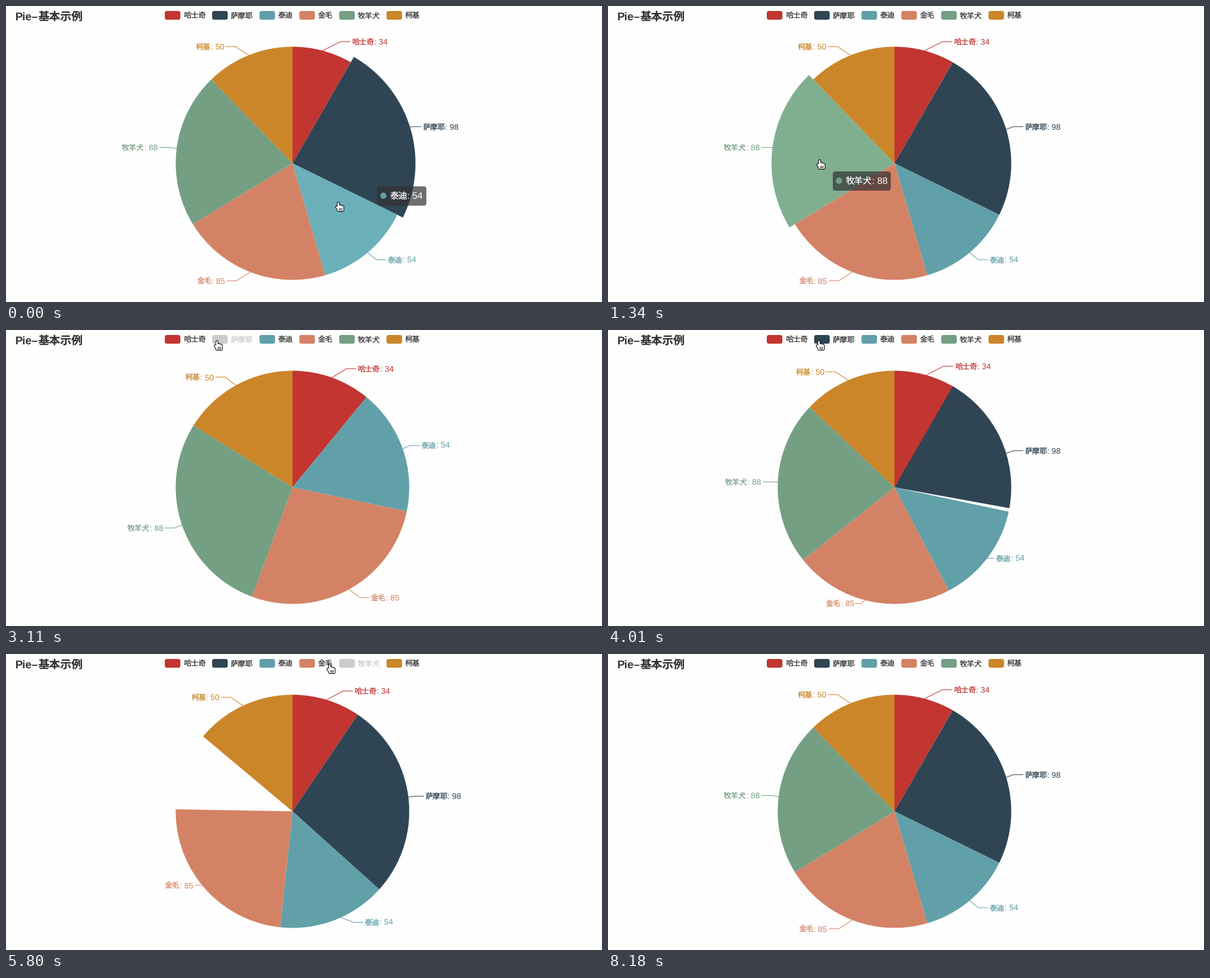
A matplotlib script for the animation above (8400 ms loop, 957 px wide and 476 px high).

```python
import matplotlib.pyplot as plt
import numpy as np
from matplotlib.animation import FuncAnimation
from matplotlib.colors import to_rgb
from matplotlib.patches import Circle, FancyBboxPatch, Polygon, Wedge

W, H, DPI = 957, 476, 64
PT = 72 / DPI
LOOP, TICK = 8400, 20
CX, CY, R = 460, 253, 187.5
GROW, LEN1, LEN2 = 10, 15, 15
EASE_MS = 300
CJK, LATIN = "Noto Sans CJK JP", "Liberation Sans"
INK, GREY = "#333333", "#cccccc"
KEY_TOP, KEY_BOTTOM = 8, 22

NAMES = ["哈士奇", "萨摩耶", "泰迪", "金毛", "牧羊犬", "柯基"]
VALUES = [34, 98, 54, 85, 88, 50]
COLORS = ["#c23531", "#2f4554", "#61a0a8", "#d48265", "#749f83", "#ca8629"]
LIFTED = [tuple(min(1, 1.1 * v) for v in to_rgb(c)) for c in COLORS]
N = len(NAMES)

# legend clicks: (time in ms, item)
CLICKS = [(2763, 1), (3874, 1), (5732, 4), (6328, 3), (6967, 3), (7690, 4)]

# pointer moves: first step, last step, then the Bezier points of the path
AWAY = (970, 495)
GLIDES = [
    (-1, 0, (600, 260), (536, 323)),
    (0, 8, (536, 323), (470, 395), (342, 255)),
    (10, 15, (342, 255), (341, 25)),
    (28, 32, (341, 25), (720, 40), AWAY),
    (33, 38, (766, 190), (680, 30), (567, 24)),
    (38, 39, (567, 24), (522, 24)),
    (39, 41, (522, 24), (490, 24)),
    (50, 52, (490, 24), (550, 24)),
    (52, 55, (550, 24), (720, 40), AWAY),
]
HOT = np.array([-2.5, -8.5])

# the picture advances in uneven steps of about 149 ms
STEPS, STEP_MS = [0, 19, 55], [0, 2810, 8180]


def step_at(ms):
    return np.interp(ms, STEP_MS, STEPS)


def pointer(step):
    """Centre of the pointer, gliding with a smooth start and stop."""
    first, last, *path = [g for g in GLIDES if g[0] <= step][-1]
    t = min(1, (step - first) / (last - first))
    t = t * t * (3 - 2 * t)
    pts = np.array(path, float)
    while len(pts) > 1:
        pts = pts[:-1] + t * (pts[1:] - pts[:-1])
    return pts[0]


def layout(shown):
    """Angles, guide line points, label anchor and side of each item."""
    total = sum(VALUES[i] for i in shown)
    angle, out = 0, {}
    for i in sorted(shown):
        end = angle + 360 * VALUES[i] / total
        mid = np.radians((angle + end) / 2)
        nx, ny = np.sin(mid), -np.cos(mid)
        side = 1 if nx > 0 else -1
        y = CY + ny * (R + LEN1)
        x = CX + side * np.sqrt((R + LEN1 + LEN2) ** 2 - (y - CY) ** 2)
        bend = x - side * 3
        out[i] = np.array([angle, end, CX + nx * R, CY + ny * R,
                           bend - side * LEN2, y, bend, y, x, side])
        angle = end
    return out


def pie_state(step):
    """Layout at a step, eased from the previous set of items."""
    now = np.interp(step, STEPS, STEP_MS)
    shown, old, p = set(range(N)), set(range(N)), 1
    for ms, item in CLICKS:
        if ms <= now:
            old, shown = shown, shown ^ {item}
            p = 1 - (1 - min(1, (now - ms) / EASE_MS)) ** 3
    before, after = layout(old), layout(shown)
    for i, new in after.items():
        if i in before:
            new[:9] = before[i][:9] + p * (new[:9] - before[i][:9])
        else:
            new[1] = new[0] + p * (new[1] - new[0])
    return after


def under(step):
    """Item whose legend entry or slice lies under the pointer."""
    x, y = pointer(step) + HOT
    if KEY_TOP <= y <= KEY_BOTTOM:
        for i in range(N):
            if KEY_X[i] <= x <= KEY_X[i] + 30 + 12 * len(NAMES[i]):
                return i
    if np.hypot(x - CX, y - CY) < R:
        angle = np.degrees(np.arctan2(x - CX, CY - y)) % 360
        for i, (start, end, *_) in pie_state(step).items():
            if start <= angle < end:
                return i
    return None


def hover(step):
    """Highlighted item; a click clears it until the pointer moves."""
    clicked = [np.ceil(step_at(ms)) for ms, _ in CLICKS]
    clicked = [k for k in clicked if k <= step]
    if clicked and np.allclose(pointer(step), pointer(clicked[-1])):
        return None
    return under(step)


def tip_pos(step):
    pos = np.array([596., 290.])
    for k in range(1, step + 1):
        pos += .85 * (pointer(k) + (19, 11) - pos)
    return np.rint(pos)


plt.rcParams["text.hinting"] = "none"
fig = plt.figure(figsize=(W / DPI, H / DPI), dpi=DPI, facecolor="#fefefe")
ax = fig.add_axes([0, 0, 1, 1])
ax.set(xlim=(0, W), ylim=(H, 0))
ax.axis("off")


def write(x, y, s, size, color, font=CJK, z=4, weight="medium"):
    return ax.text(x, y, s, fontsize=size * PT, color=color, family=font,
                   va="baseline", ha="left", zorder=z, weight=weight,
                   clip_on=True)


def round_box(x, y, w, h, r, color, z=3, **kw):
    style = f"round,pad=0,rounding_size={r}"
    return ax.add_patch(FancyBboxPatch((x, y), w, h, boxstyle=style, lw=0,
                                       fc=color, zorder=z, **kw))


class Label:
    """A name followed by its value, the value set in a Latin face."""

    def __init__(self, size, color, z):
        self.size = size
        self.name = write(0, 0, "", size, color, z=z)
        self.value = write(0, 0, "", size + 1, color, LATIN, z)

    def put(self, item, x, y, side=1):
        name = NAMES[item]
        wide = self.size * len(name)
        if side < 0:
            x -= wide + 1.668 * (self.size + 1)
        self.name.set(text=name, position=(x, y))
        self.value.set(text=f": {VALUES[item]}", position=(x + wide, y))

    def show(self, on):
        self.name.set_visible(on)
        self.value.set_visible(on)


write(15, 23, "Pie–", 18, INK, LATIN, weight="bold")
write(52, 23, "基本示例", 18, INK, weight="bold")

KEY_X, keys, key_names = [], [], []
left = 255
for name, color in zip(NAMES, COLORS):
    KEY_X.append(left)
    keys.append(round_box(left, KEY_TOP, 25, KEY_BOTTOM - KEY_TOP, 3.5, color))
    key_names.append(write(left + 30, 19.5, name, 12, INK))
    left += 40 + 12 * len(name)

wedges, lines, labels = [], [], []
for color in COLORS:
    wedges.append(ax.add_patch(Wedge((CX, CY), R, 0, 1, lw=0, zorder=2)))
    lines += ax.plot([], [], color=color, lw=PT, zorder=1)
    labels.append(Label(12, color, 4))

tip_box = round_box(0, 0, 79, 31, 4, (50 / 255,) * 3, 6, alpha=.7)
tip_dot = ax.add_patch(Circle((0, 0), 5, lw=0, zorder=7))
tip_text = Label(14, "white", 7)


def segments(*pairs):
    """Separate strokes joined into one point list."""
    gap = (np.nan, np.nan)
    return np.array([p for a, b in pairs for p in (a, b, gap)])


def stroke(color, width, z):
    return ax.plot([], [], color=color, lw=width * PT, zorder=z,
                   solid_capstyle="round")[0]


# the hand is four upright fingers and a thumb, outlined in black
FINGERS = segments(((-5, .4), (-2, 4.5)),
                   *[((x, top), (x, 5.8)) for x, top in
                     zip(np.arange(4) * 2.3 - 2.3, [-6.2, -1.6, -1.1, -.3])])
FOLDS = segments(*[((x, 1.9), (x, 5)) for x in (-.8, 1.3, 3.4)])
hand = [(stroke("black", 4.6, 9), FINGERS), (stroke("white", 2.6, 10), FINGERS),
        (stroke("black", .9, 11), FOLDS)]

ARROW = HOT + [(0, 0), (0, 14.5), (3.3, 11.4), (5.6, 16.6), (7.8, 15.6),
               (5.6, 10.6), (10.2, 10.4)]
arrow = ax.add_patch(Polygon(ARROW, fc="black", ec="white", lw=PT, zorder=9))


def draw_pie(step):
    state = pie_state(step)
    lifted, grown = hover(step), hover(step - 1)
    for i in range(N):
        on = i in state
        keys[i].set_facecolor(COLORS[i] if on else GREY)
        key_names[i].set_color(INK if on else GREY)
        wedges[i].set_visible(on)
        lines[i].set_visible(on)
        labels[i].show(on)
        if not on:
            continue
        a0, a1, *pts, x, side = state[i]
        big = i == grown and lifted is not None
        wedges[i].set(theta1=a0 - 90, theta2=a1 - 90, radius=R + GROW * big,
                      facecolor=LIFTED[i] if i == lifted else COLORS[i])
        lines[i].set_data(pts[::2], pts[1::2])
        labels[i].put(i, x, pts[-1] + 4.6, side)


def draw_tip(step):
    item = hover(step)
    on = item is not None and (pointer(step) + HOT)[1] > KEY_BOTTOM
    tip_box.set_visible(on)
    tip_dot.set_visible(on)
    tip_text.show(on)
    if on:
        x, y = tip_pos(step)
        tip_box.set_bounds(x, y, 51 + 14 * len(NAMES[item]), 31)
        tip_dot.set(center=(x + 10, y + 15), facecolor=COLORS[item])
        tip_text.put(item, x + 20.5, y + 20)


def draw_pointer(step):
    at = pointer(step)
    over = under(step) is not None
    arrow.set_visible(not over)
    arrow.set_xy(ARROW + at)
    for line, shape in hand:
        line.set_visible(over)
        line.set_data(*(shape + at).T)


def draw(n):
    step = int(step_at(n * TICK + TICK / 2) + .01)
    draw_pie(step)
    draw_tip(step)
    draw_pointer(step)
    return []


anim = FuncAnimation(fig, draw, frames=LOOP // TICK, interval=TICK,
                     repeat=True, repeat_delay=0)
plt.show()
```
